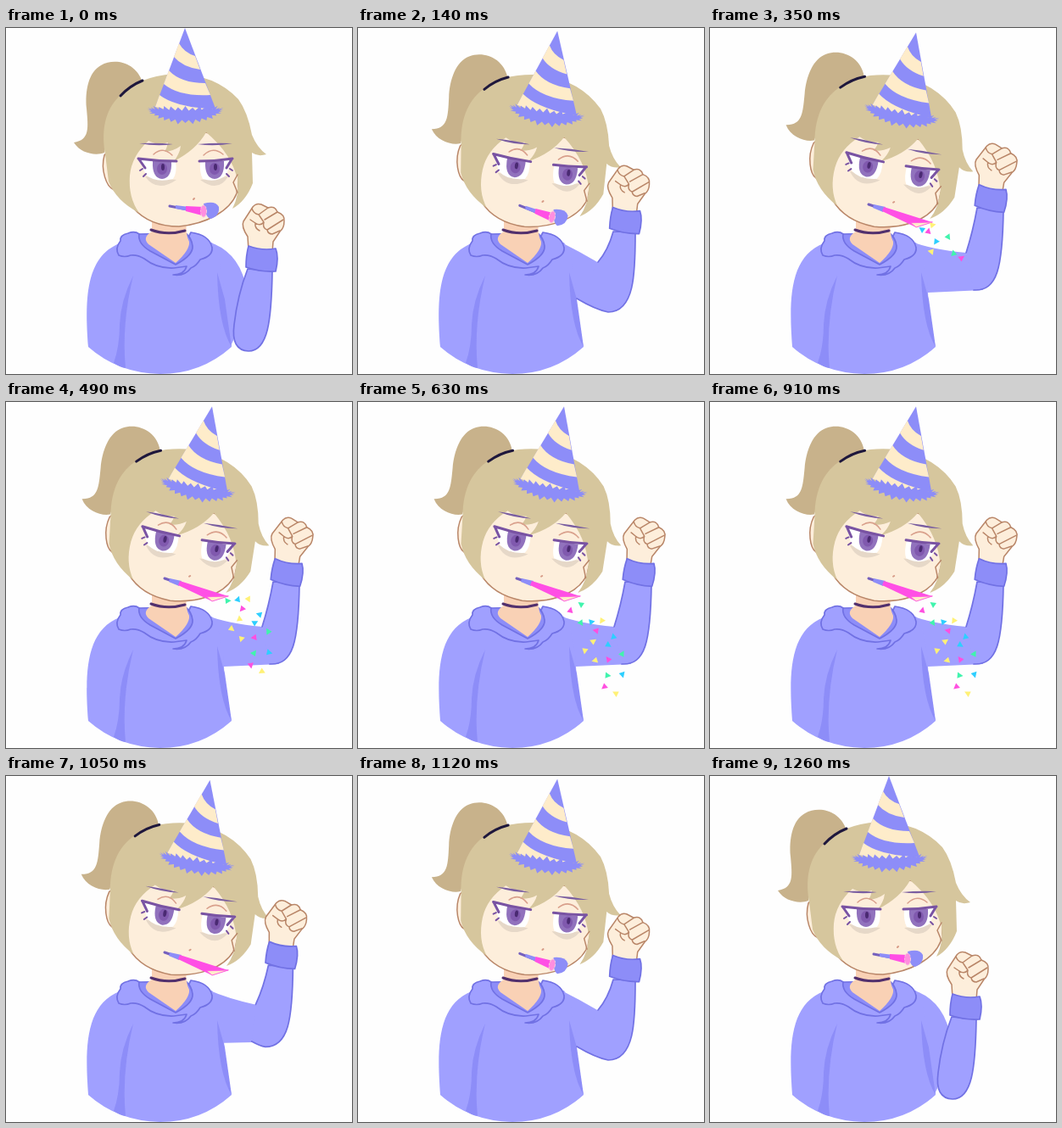
Write an HTML page that moves like this. It is 408 px wide and 408 px high and loops after 2460 ms.

```html
<!DOCTYPE html>
<html>
<head>
<meta charset="utf-8">
<style>
html, body { margin: 0; width: 100%; height: 100%; overflow: hidden; background: #fefefe }
svg { display: block; width: 100%; height: 100% }
path, ellipse { stroke-linecap: round; stroke-linejoin: round }
.cloth { fill: #a0a0ff }
.trim { fill: #8d8df8 }
.seam { stroke: #7171e4; stroke-width: 1.7 }
.skin { fill: #fdeedb }
.line { stroke: #b98668; stroke-width: 1.5 }
.hair { fill: #d6c69d }
.cream { fill: #feecca }
.lash { stroke: #7953a3; fill: none }
.open { fill: none }
</style>
</head>
<body>
<svg viewBox="0 0 408 408">
  <path id="upper" class="cloth"/>
  <path class="cloth" d="M97 376C93 322 93 270 134 254L243 253Q256 276 257 312Q258 345 266 376Q230 408 182 408Q132 407 97 376Z"/>
  <g class="trim">
    <path d="M150 292Q135 322 134 350Q134 375 127 395Q134 400 141 401Q136 350 150 292Z"/>
    <path d="M249 288L258 320L266 376Q250 350 249 288Z"/>
  </g>
  <path class="cloth seam" d="M157 243Q152 239 144 242Q134 244 135 251Q128 260 133 268Q140 271 147 268Q155 267 163 272Q178 284 198 283L213 281Q210 291 197 291Q211 293 218 283Q224 281 229 273Q244 269 243 259Q240 244 218 241L199 278Z"/>
  <path class="trim seam" d="M157 243Q155 254 170 263L200 279Q221 268 220 257Q219 248 212 242Z"/>
  <path fill="#f9d1b5" d="M172 222V240Q160 247 168 255L200 277Q217 262 216 252Q211 243 213 222Z"/>
  <path class="open" stroke="#52306d" stroke-width="3" d="M171 238Q190 245 211 239"/>
  <path id="fore" class="cloth seam"/>

  <g id="head">
    <path fill="#c8b28b" d="M161 64C153 40 128 35 112 44C97 52 93 75 95 95C97 118 99 132 80 135C88 148 106 151 116 147L124 100Z"/>
    <path class="skin line" d="M116 150C111 168 119 187 126 190Q139 199 150 212C163 227 182 234 204 234C236 231 264 216 272 195L280 130L150 110Z"/>
    <path class="hair" d="M117 149C111 115 120 93 135 79Q154 58 198 54Q246 54 274 84Q285 99 290 126Q296 141 307 149Q297 152 290 147L291 183Q283 204 267 213Q275 198 273 179Q266 148 236 123Q224 144 198 157Q205 148 206 139Q198 145 187 146Q190 141 191 135Q180 139 168 133Q148 151 146 174Q144 200 157 218Q130 204 121 181Z"/>
    <path class="skin line" d="M273 173L268 182L273 194"/>
    <path class="open" stroke="#1e173c" stroke-width="3" d="M135 80Q146 68 161 62"/>

    <g fill="#e6d8c8">
      <path d="M164 175Q178 195 201 179Z"/><path d="M229 179Q250 195 262 175Z"/>
    </g>
    <path fill="#fff" d="M157 155L200 157Q202 171 197 178Q176 183 165 173Z"/>
    <path fill="#fff" d="M266 155L229 157Q228 171 232 178Q249 183 260 173Z"/>
    <g id="eyes"></g>
    <path class="lash" stroke-width="3" d="M156 154Q178 157 201 157M228 157Q248 157 267 154M157 155L164 165M266 155L260 165"/>
    <path class="lash" stroke-width="2" d="M165 172L162 175M161 166L158 168M260 172L263 175M264 166L267 168"/>
    <path fill="#795da0" d="M157 136Q178 135 197 137Q178 140 157 136ZM226 137Q246 135 267 136Q246 140 226 137Z"/>
    <path class="open" stroke="#d9a08c" stroke-width="1.5" d="M174 149Q185 139 196 150M233 150Q244 139 256 149"/>
    <path class="open" stroke="#d79a86" stroke-width="2" d="M221 202L222 201"/>

    <path class="trim" d="M211 0L176 93Q210 103 247 95Z"/>
    <g class="cream">
      <path d="M204 18Q210 29 223 33L229 49Q208 46 198 34Z"/>
      <path d="M192 50Q206 65 235 65L241 79Q204 81 186 66Z"/>
      <path d="M181 79Q198 92 236 95L210 101L176 93Z"/>
    </g>
    <path id="fluff" class="trim"/>

    <g id="rolled">
      <path class="open" stroke="#7560bd" stroke-width="3" d="M193 210L214 214"/>
      <path class="trim" d="M200 209L216 211V216L200 213Z"/>
      <path fill="#ff4fe5" d="M212 210L233 211L235 222L212 216Z"/>
      <path class="trim" d="M233 207Q247 203 251 211Q252 222 241 225Q235 223 233 207Z"/>
      <ellipse cx="233" cy="216" rx="3.5" ry="7" fill="#ff8edf" stroke="#f8cadd" stroke-dasharray="2 2"/>
    </g>
  </g>

  <g id="blown">
    <path class="open" stroke="#7560bd" stroke-width="3" d="M187 208L199 212"/>
    <path class="trim" d="M193 208L207 211L204 217L192 212Z"/>
    <path fill="#ff4fe5" d="M205 211L262 229L243 235L203 216Z"/>
    <path class="cream" stroke="#ff65df" d="M262 229L243 235L237 230Z"/>
  </g>

  <g id="hand">
    <path class="skin line" d="M286 262L285 246Q277 234 280 228L291 211Q295 206 301 208L309 212Q317 209 320 217Q329 220 328 228Q328 236 323 240L315 252L314 264Z"/>
    <path class="open line" d="M309 212L298 220Q292 219 290 213M298 220L304 229Q300 234 294 230L288 226M320 217L305 226M304 229Q302 236 308 238L327 226M308 238Q309 243 314 243L323 239M294 230Q293 236 299 239"/>
    <path class="trim seam" d="M286 257Q302 263 318 260Q322 270 318 287Q300 288 283 282Q283 268 286 257Z"/>
  </g>
  <g id="confetti"></g>
</svg>
<script>
const $ = id => document.getElementById(id);
const STEP = 70, LOOP = 2460, LAST = 18, UP = 4;

// Arm shapes: lowered, half raised, raised
const fore = [
  'M269 350Q273 315 285 284L314 287C313 345 309 381 286 381Q265 380 269 350',
  'M283 276Q295 262 301 240L327 241C327 290 326 335 295 335Q280 332 258 319',
  'M302 265Q310 240 315 212L346 214C345 285 338 309 313 309Q312 309 311 309'];
const upper = [
  'M238 252Q272 262 282 300L285 330L265 375L240 330Z',
  'M238 252Q262 264 284 277L300 320L258 319L240 310Z',
  'M238 252Q260 261 302 265L322 309L257 312L240 300Z'];
const hand = ['translate(0 0) rotate(0 302 272)', 'translate(14 -45) rotate(2 302 272)', 'translate(30 -71) rotate(5 302 272)'];
const armAt = [0, .55, 1, 1.6, 2], headAt = [0, .4, .75, .92, 1];

function mix(keys, u) {
  const i = Math.min(1, Math.floor(u)), to = keys[i + 1].match(/-?\d+/g);
  let n = 0;
  return keys[i].replace(/-?\d+/g, a => +a + (to[n++] - a) * (u - i) + ' ');
}

const colors = { p: '#ff4fe0', c: '#2dcfff', g: '#40f4ad', y: '#fff176' };
const burst = 'c250,238 p257,240 y262,232 g281,246 c267,252 y261,264 g287,266 p296,271'.split(' ');
const shower = ('g263,239 p250,246 c275,259 g263,260 y288,258 p281,270 c301,277 y277,282 c295,286 ' +
  'y268,293 y280,305 p295,304 g311,297 g294,322 c312,321 p291,336 y304,344').split(' ');

const bits = (list, k) => list.map((s, i) => {
  const [x, y] = s.slice(1).split(',').map(Number);
  const top = y + 13 * k;
  return top < 231 ? '' : `<path fill="${colors[s[0]]}" transform="translate(${x + k} ${top}) rotate(${i * 67 + k * 30})" d="M-3.5-3L4-2L0 4Z"/>`;
}).join('');

function confetti(f) {
  if (f < UP || f > LAST - UP) return '';
  if (f < 6) return bits(burst, f - 5);
  if (f < 9) return bits(shower, f - 9);
  const k = (f - 9) % 4;
  return bits(shower, k) + (k ? bits(shower, k - 4) : '');
}

$('eyes').innerHTML = [184, 246].map(x =>
  `<path fill="#9172bd" d="M${x - 11} 157H${x + 11}Q${x + 12} 177 ${x} 178Q${x - 12} 177 ${x - 11} 157Z"/>
   <ellipse cx="${x}" cy="166" rx="6" ry="7" fill="#8059ae"/>
   <ellipse cx="${x + 1}" cy="164" rx="2" ry="4" fill="#4a2a72"/>`).join('');

// Ragged trim around the hat's brim
const spikes = Array.from({ length: 64 }, (_, i) => {
  const a = i * Math.PI / 32, s = i % 2 ? -2.5 : 2 + Math.sin(i * 5);
  const x = (43 + s) * Math.cos(a);
  return [211.5 + x, 103 - x * x / 280 + (8 + s) * Math.sin(a)].map(v => v.toFixed(1));
});
$('fluff').setAttribute('d', 'M' + spikes.join('L') + 'Z');

let shown = -1;
function draw(now) {
  const f = Math.min(LAST, Math.floor(now % LOOP / STEP));
  if (f !== shown) {
    shown = f;
    const i = Math.min(f, LAST - f, UP), u = armAt[i], p = headAt[i], blown = i > 2;
    $('fore').setAttribute('d', mix(fore, u));
    $('upper').setAttribute('d', mix(upper, u));
    $('hand').setAttribute('transform', mix(hand, u));
    $('head').setAttribute('transform', `translate(${2 * p} ${-2.2 * p}) rotate(${10.5 * p} 185 167)`);
    $('rolled').setAttribute('transform', `translate(${3 * p} 0) rotate(${4 * p} 193 210)`);
    $('rolled').style.display = blown ? 'none' : '';
    $('blown').style.display = blown ? '' : 'none';
    $('confetti').innerHTML = confetti(f);
  }
  requestAnimationFrame(draw);
}
draw(performance.now());
</script>
</body>
</html>
```
